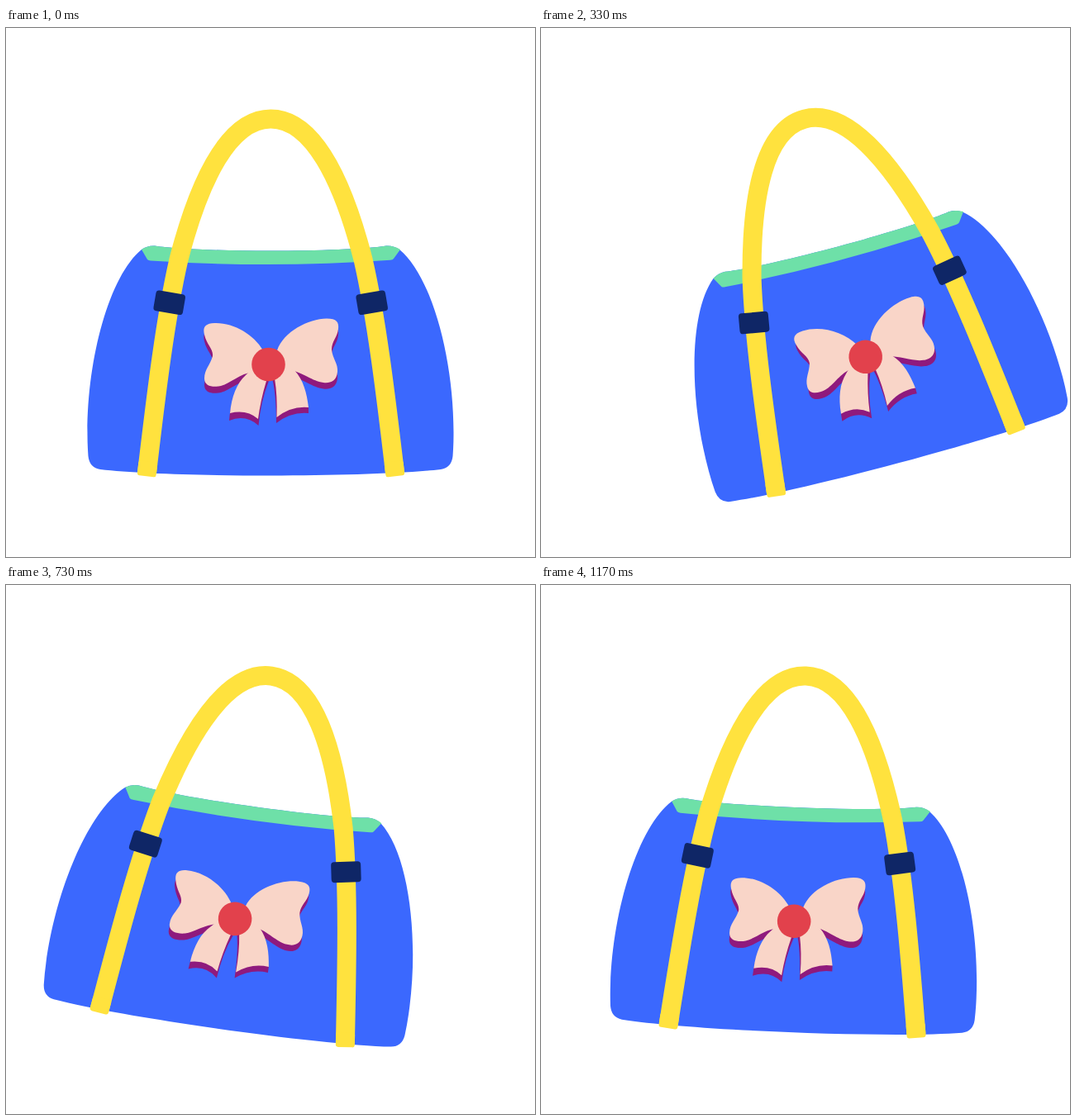
Animation, 640 px wide and 640 px high, one loop 1210 ms. Source, as an HTML page:

```html
<!DOCTYPE html>
<html lang="en">
<head>
<meta charset="utf-8">
<title>Swinging bag</title>
<style>
  html, body { margin: 0; width: 100%; height: 100%; overflow: hidden; background: #fff; }
  svg { display: block; width: 100vw; height: 100vh; }
  .blue { fill: #3b68fe; }
  .mint { fill: #6ee0a8; }
  .navy { fill: #0f2666; }
  .plum { fill: #8f1a7d; }
  .pink { fill: #f9d5c8; }
  .red { fill: #e2414c; }
  .strap { fill: none; stroke: #ffe23e; stroke-width: 23; }
  .end { fill: #ffe23e; }
</style>
</head>
<body>
<svg viewBox="0 0 640 640">
  <defs>
    <path id="wingL" d="M318 407 L311 390 C300 371 275 356 252 357 C240 357.500 238 363 240 371 C243 384 251 388 250 397 C247 408 240 413 240 424 C240 434 251 435 260 433 C272 430 282 418 300 416 Z"/>
    <path id="wingR" d="M318 407 L328 390 C336 367 366 352 388 351.500 C400 351.500 403 356 402 364 C401 374 394 379 394 389 C395 400 402 406 401 416 C400 428 391 430 384 429 C370 427 362 418 340 412 Z"/>
    <rect id="clip" class="navy" x="-18" y="-12.500" width="36" height="25" rx="4"/>
    <rect id="end" class="end" x="-11.500" y="-18" width="23" height="18" rx="3"/>
  </defs>
  <g id="bag">
    <path class="blue" d="M164 268 Q171 263 180 263.500 C230 271.500 410 271.500 460 263.500 Q469 263 476 268 C515 300 542 400 541.500 492 Q541.500 504 540.500 518 Q539 532 526 534 C440 544 200 544 114 534 Q101 532 99.500 518 Q98.500 504 98.500 492 C98 400 125 300 164 268 Z"/>
    <path class="mint" d="M164 268 Q171 263 180 263.500 C230 271.500 410 271.500 460 263.500 Q469 263 477 268 L469 279 Q468 280.500 465 280.800 Q320 291 175 281.500 Q172 281.300 171 280 Z"/>
    <path class="strap" d="M170.500 538 C182 440 193 350 209 280 C234 183 270 110 320.300 110 C371 110 407 183 432 280 C448 350 459 440 470.500 538"/>
    <use href="#end" transform="translate(170 542.300) rotate(6.500)"/>
    <use href="#end" transform="translate(471 542.300) rotate(-6.500)"/>
    <use href="#clip" transform="translate(197.700 332.300) rotate(9.700)"/>
    <use href="#clip" transform="translate(442.700 332.300) rotate(-9.700)"/>

    <use href="#wingL" class="plum" y="8"/>
    <use href="#wingR" class="plum" y="7.500"/>
    <path class="plum" d="M290 420 Q272 445 270 475 Q290 467 305.500 481 Q308 452 318 427 L310 410 Z"/>
    <path class="plum" d="M321 420 Q327 440 327 478 Q345 464 366 466 L366 459 L345 412 Z"/>
    <path class="pink" d="M290 420 C279 430 273 446 271 466 Q291 461 305 473 Q308 450 315 427 L312 408 L298 412 Z"/>
    <path class="pink" d="M325 424 Q328.500 445 327.500 471 Q345 457 366 459 C364 442 360 426 349 414 L330 406 Z"/>
    <use href="#wingL" class="pink"/>
    <use href="#wingR" class="pink"/>
    <circle class="red" cx="317.500" cy="407" r="20.300"/>
  </g>
</svg>
<script>
  const LOOP = 1210, SHOTS = 36, POSES = 30, PEAK = 15.1;
  const bag = document.getElementById('bag');

  const cubic = (a, b, s) => 3 * a * s * (1 - s) ** 2 + 3 * b * s * s * (1 - s) + s ** 3;

  function ease(x1, y1, x2, y2) {
    return u => {
      let lo = 0, hi = 1;
      for (let n = 0; n < 24; n++) {
        const mid = (lo + hi) / 2;
        if (cubic(x1, x2, mid) < u) lo = mid; else hi = mid;
      }
      return cubic(y1, y2, lo);
    };
  }

  // start pose, end pose, start angle, end angle, easing
  const swing = [
    [0, 7.5, 0, PEAK, ease(.3, .26, .53, 1)],
    [7.5, 22.5, PEAK, -PEAK, ease(.27, 0, .73, 1)],
    [22.5, 30, -PEAK, 0, ease(.47, 0, .7, .74)]
  ];

  function angleAt(pose) {
    const [from, to, a, b, curve] = swing.find(part => pose < part[1]);
    return a + (b - a) * curve((pose - from) / (to - from));
  }

  // 30 poses held over 36 display ticks
  function poseAt(ms) {
    const tick = Math.min(SHOTS - 1, Math.floor((ms + 4) * 3 / 100));
    return Math.max(0, Math.ceil(tick * POSES / SHOTS - .5));
  }

  function draw() {
    const angle = angleAt(poseAt(performance.now() % LOOP));
    bag.setAttribute('transform', `rotate(${-angle} 320 116)`);
    requestAnimationFrame(draw);
  }
  draw();
</script>
</body>
</html>
```
